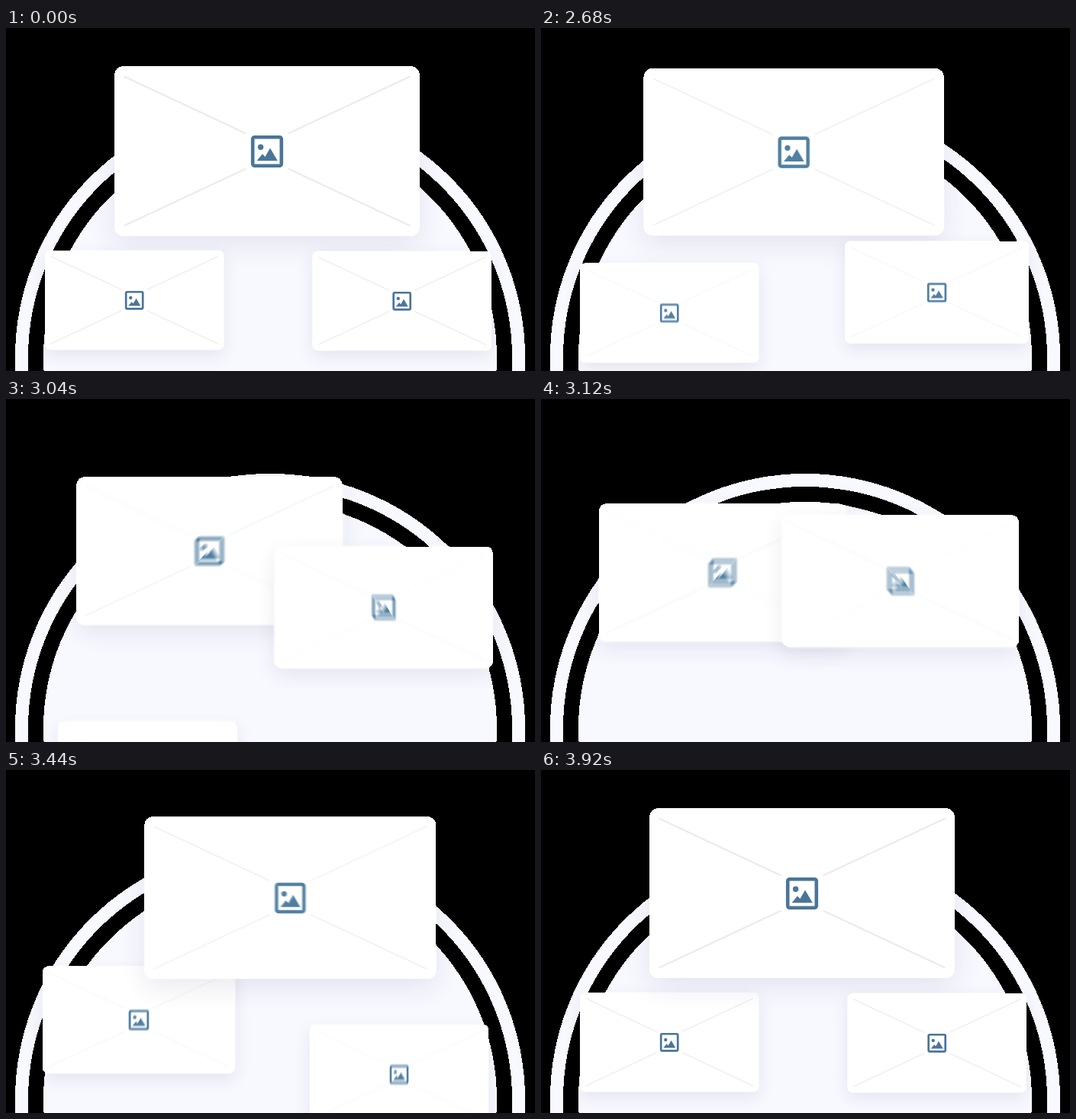
An HTML page with a canvas that plays this animation: 693 px wide and 450 px high, repeating every 5.96 s.

```html
<!DOCTYPE html>
<html lang="en">
<head>
<meta charset="utf-8">
<title>Card carousel</title>
<style>
  html, body { margin: 0; width: 100%; height: 100%; overflow: hidden; background: #000; }
  canvas { display: block; filter: url(#hard); }
  svg { position: absolute; width: 0; height: 0; }
</style>
</head>
<body>
<canvas id="stage" width="693" height="450"></canvas>
<svg aria-hidden="true">
  <!-- crisp outline: alpha is either off or on -->
  <filter id="hard" x="0" y="0" width="1" height="1" color-interpolation-filters="sRGB">
    <feComponentTransfer><feFuncA type="discrete" tableValues="0 1"/></feComponentTransfer>
  </filter>
</svg>
<script>
const W = 693, H = 450;
const LOOP = 5960, TICK = 40, START = 2360, LENGTH = 1560;
const SHUTTER = 20, SAMPLES = 16;
const CARD_W = 400, CARD_H = 223, SMALL = 0.586;
const PALE = '#f8f9ff', BLUE = '#4a7599', LINE = '#ebebeb';

const ctx = document.getElementById('stage').getContext('2d');
const makeLayer = () => {
  const c = document.createElement('canvas');
  c.width = W;
  c.height = H;
  return c.getContext('2d');
};
const layer = makeLayer(), blend = makeLayer();

// Symmetric ease in and out: cubic-bezier(.69, 0, .31, 1)
function ease(u) {
  if (u <= 0) return 0;
  if (u >= 1) return 1;
  const a = 0.69;
  let lo = 0, hi = 1;
  for (let i = 0; i < 30; i++) {
    const s = (lo + hi) / 2, r = 1 - s;
    const x = 3 * a * s * r * r + 3 * (1 - a) * s * s * r + s * s * s;
    if (x < u) lo = s; else hi = s;
  }
  return lo * lo * (3 - 2 * lo);
}
const progress = t => ease((t - START) / LENGTH);

function track(d) {
  const path = document.createElementNS('http://www.w3.org/2000/svg', 'path');
  path.setAttribute('d', d);
  const len = path.getTotalLength();
  return p => path.getPointAtLength(p * len);
}
const topToLeft = track('M342 161.5C275 161.5 168 296 168.2 357');
const rightToTop = track('M518.7 358C522 275 430 168 342 161.5');

// Sinks below the stage on the left, rises again on the right
function leftToRight(p) {
  if (p < 0.5) return { x: 168.2 + 570 * p ** 3, y: 357 + 423 * p };
  const d = 1 - p;
  return { x: 518.7 - 312 * d * d, y: 358 + 380 * d };
}

const pose = ({ x, y }, k) => ({ x, y, k });
const cards = [
  p => pose(topToLeft(p), 1 + (SMALL - 1) * p),
  p => pose(rightToTop(p), SMALL + (1 - SMALL) * p),
  p => pose(leftToRight(p), SMALL)
];

function place(c, { x, y, k }) {
  c.setTransform(k, 0, 0, k, x, y);
}
function plate(c) {
  c.beginPath();
  c.roundRect(-CARD_W / 2, -CARD_H / 2, CARD_W, CARD_H, 12);
  c.fillStyle = '#fff';
  c.fill();
}

function drawCard(c, at) {
  c.save();
  place(c, at);
  plate(c);

  c.beginPath();
  for (const sx of [-1, 1]) {
    for (const sy of [-1, 1]) {
      c.moveTo(sx * 187.5, sy * 98);
      c.lineTo(sx * 27.5, sy * 23);
    }
  }
  c.strokeStyle = LINE;
  c.lineWidth = 2;
  c.stroke();

  // picture icon
  c.translate(0, 0.5);
  c.beginPath();
  c.roundRect(-18.8, -18.8, 37.6, 37.6, 2.5);
  c.strokeStyle = BLUE;
  c.lineWidth = 4.6;
  c.stroke();
  c.fillStyle = BLUE;
  c.beginPath();
  c.arc(-8.4, -5.8, 3.7, 0, 7);
  c.fill();
  c.beginPath();
  c.moveTo(-13.5, 12.3);
  c.lineTo(-6, 3.2);
  c.lineTo(-2.6, 7);
  c.lineTo(4, -4.4);
  c.lineTo(13.8, 12.3);
  c.fill();
  c.restore();
}

// Falls only on what is already painted
function drawShadow(at) {
  ctx.save();
  ctx.globalCompositeOperation = 'source-atop';
  place(ctx, at);
  ctx.shadowColor = 'rgba(45, 35, 85, .1)';
  ctx.shadowBlur = 36 * at.k;
  ctx.shadowOffsetY = 12 * at.k;
  plate(ctx);
  ctx.restore();
}

function drawBlurred(card, t) {
  blend.clearRect(0, 0, W, H);
  blend.globalCompositeOperation = 'lighter';
  blend.globalAlpha = 1 / SAMPLES;
  for (let i = 0; i < SAMPLES; i++) {
    const time = t + SHUTTER * ((i + 0.5) / SAMPLES - 0.5);
    layer.clearRect(0, 0, W, H);
    drawCard(layer, card(progress(time)));
    blend.drawImage(layer.canvas, 0, 0);
  }
  ctx.drawImage(blend.canvas, 0, 0);
}

function drawBackdrop() {
  ctx.clearRect(0, 0, W, H);
  ctx.fillStyle = ctx.strokeStyle = PALE;
  ctx.lineWidth = 17;
  ctx.beginPath();
  ctx.arc(346, 432, 325.5, 0, 7);
  ctx.stroke();
  ctx.beginPath();
  ctx.arc(346, 432, 297, 0, 7);
  ctx.fill();
}

function draw(t) {
  const p = progress(t), moving = p > 0 && p < 1;
  drawBackdrop();
  for (const card of cards) {
    const at = card(p);
    drawShadow(at);
    if (moving) drawBlurred(card, t);
    else drawCard(ctx, at);
  }
}

const begin = performance.now();
let last = -1;
function frame() {
  const t = Math.floor(((performance.now() - begin) % LOOP) / TICK) * TICK;
  if (t !== last) draw(last = t);
  requestAnimationFrame(frame);
}
frame();
</script>
</body>
</html>
```
